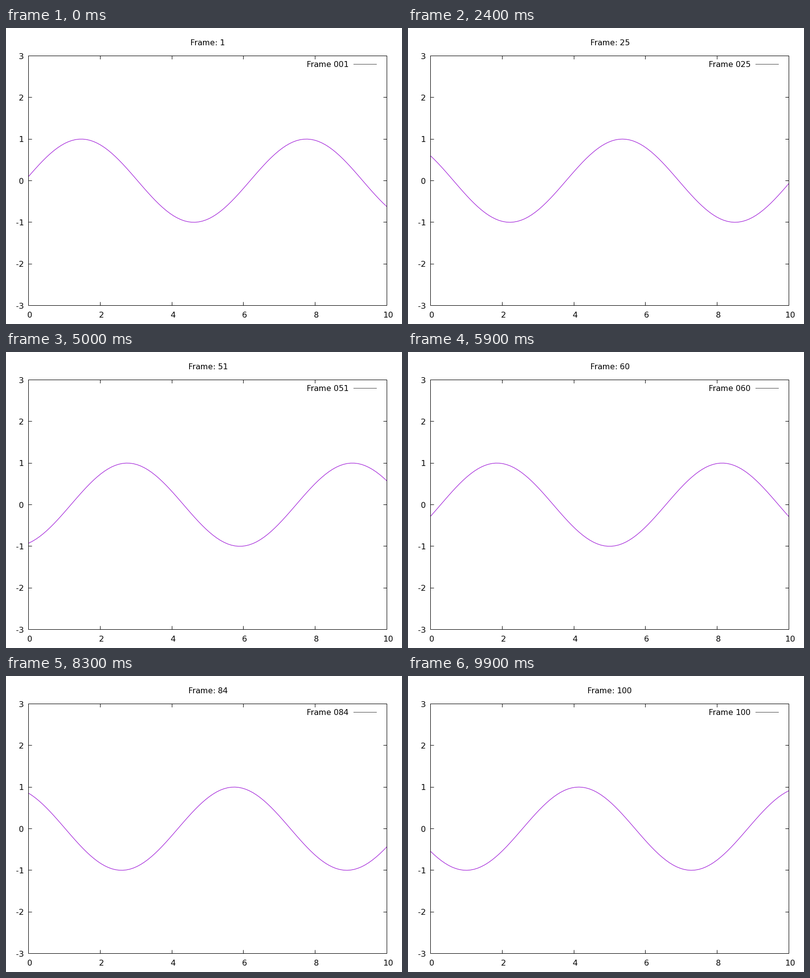
Animation, 800 px wide and 600 px high, one loop 10000 ms. Source, as a matplotlib script:

```python
import numpy as np
import matplotlib.pyplot as plt
from matplotlib.animation import FuncAnimation

W, H, DPI = 800, 600, 100
FRAMES, INTERVAL = 100, 100
LEFT, RIGHT, TOP, BOTTOM = 45.5, 769.5, 56.5, 562.5
TICK = 7
PX = 72 / DPI  # points per pixel

plt.rcParams.update({
    "font.family": "DejaVu Sans",
    "font.size": 16 * PX,
    "text.hinting_factor": 1,  # whole-pixel advances
    "path.simplify": False,
})

fig = plt.figure(figsize=(W / DPI, H / DPI), dpi=DPI, facecolor="white")
ax = fig.add_axes([0, 0, 1, 1])
ax.set_xlim(0, W)
ax.set_ylim(H, 0)
ax.axis("off")


def to_x(v):
    return LEFT + v * (RIGHT - LEFT) / 10


def to_y(v):
    return BOTTOM - (v + 3) * (BOTTOM - TOP) / 6


def line(xs, ys, color="black"):
    return ax.plot(xs, ys, color=color, lw=PX, snap=False,
                   solid_capstyle="butt", solid_joinstyle="miter")[0]


def label(x, y, text, ha):
    return ax.text(x, y, text, ha=ha, va="baseline", color="black")


for v in range(0, 11, 2):
    x = np.floor(to_x(v)) + 0.5
    label(to_x(v) + 2.5, 587, str(v), "center")
    if 0 < v < 10:
        line([x, x], [TOP, TOP + TICK])
        line([x, x], [BOTTOM, BOTTOM - TICK])

for v in range(-3, 4):
    y = np.floor(to_y(v)) + 0.5
    label(36, round(to_y(v) + 6.1), str(v), "right")
    if abs(v) < 3:
        line([LEFT, LEFT + TICK], [y, y])
        line([RIGHT, RIGHT - TICK], [y, y])

xs = np.linspace(0, 10, 100)
curve = line(to_x(xs), to_y(np.sin(xs)), "#9400d3")
line([LEFT, RIGHT, RIGHT, LEFT, LEFT], [TOP, TOP, BOTTOM, BOTTOM, TOP])

title = label(407.5, 35, "", "center")
key = label(692, 79, "", "right")
line([702, 749], [73.5, 73.5], "#4a4a4a")


def update(i):
    n = i + 1
    curve.set_ydata(to_y(np.sin(xs + n / 10)))
    title.set_text(f"Frame: {n}")
    key.set_text(f"Frame {n:03d}")
    return curve, title, key


anim = FuncAnimation(fig, update, frames=FRAMES, interval=INTERVAL,
                     repeat=True, repeat_delay=0)
plt.show()
```
